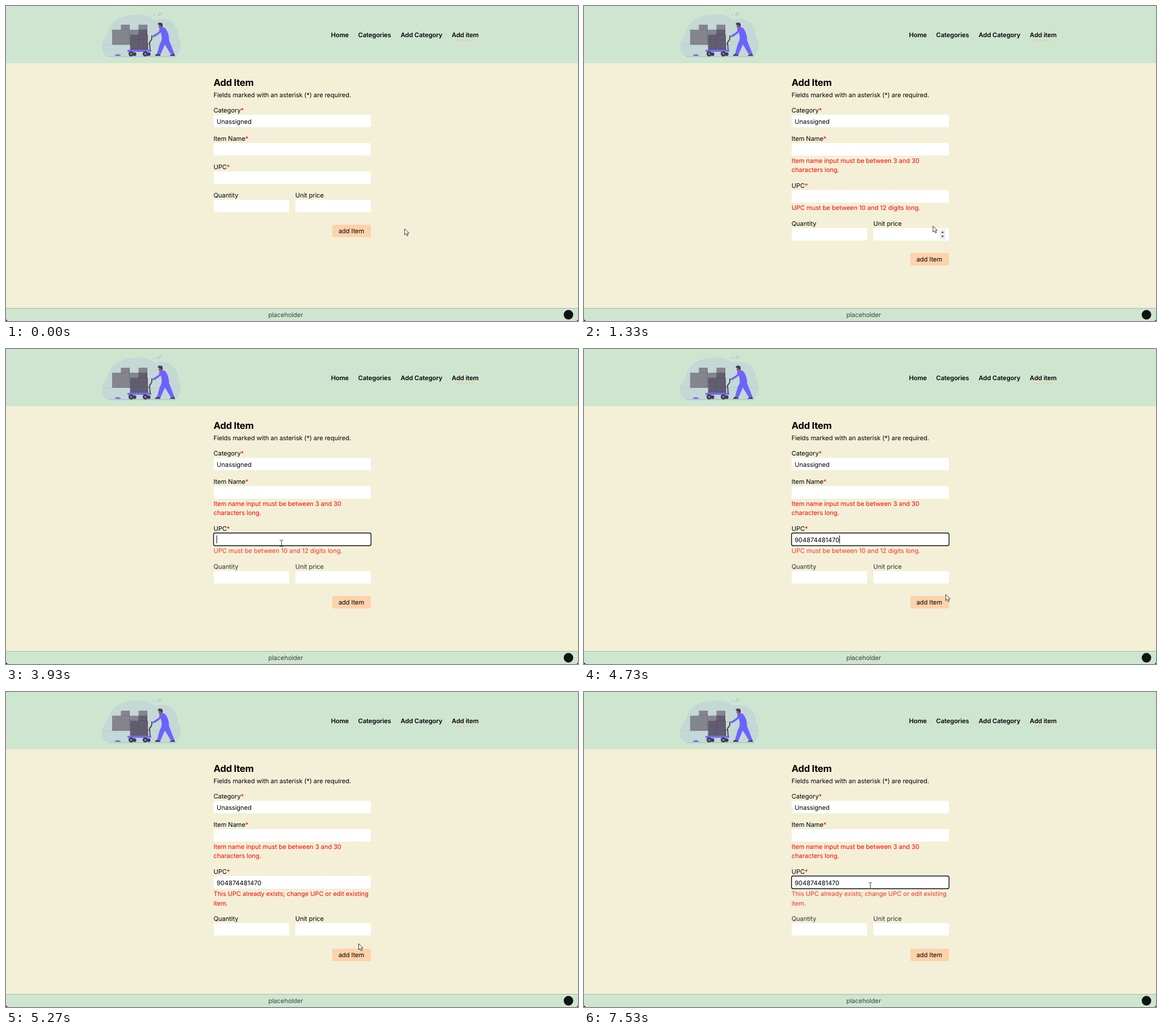
Animation of 1008x556 px, one loop 8000 ms. Source, as an HTML page with a canvas:

```html
<!DOCTYPE html>
<html lang="en">
<head>
<meta charset="utf-8">
<title>Add Item</title>
<style>
html, body { margin: 0; width: 100%; height: 100%; overflow: hidden; background: #f3f0d7; }
canvas { display: block; width: 1008px; height: 556px; }
</style>
</head>
<body>
<canvas id="stage" width="1008" height="556"></canvas>
<script>
const ctx = document.getElementById('stage').getContext('2d');
const LOOP = 8000;
const ZOOM = 0.6925;          // page zoom: 16px text with 24px lines
const LINE = 24 * ZOOM;
const LEFT = 365.7, WIDE = 400 * ZOOM, HALF = 192 * ZOOM, FIELD = 32 * ZOOM;
const UNIT_X = LEFT + WIDE - HALF;
const MINT = '#cee5d0', CREAM = '#f3f0d7', PEACH = '#fed2aa', ORANGE = '#ffbf86';
const VIOLET = '#6c63ff', DARK = '#3f3d56', SKIN = '#a0616a', RED = '#ff0000';

// Pointer path: time, x, y
const POINTER = [
  [0, 702, 393], [600, 702, 393], [670, 684, 394], [730, 637, 391], [800, 614.5, 388],
  [2530, 614.5, 388], [2600, 615.5, 388], [2670, 616, 388], [3000, 616, 388],
  [3070, 585, 377], [3130, 530, 361], [3200, 504, 354.5], [3530, 504, 354.5],
  [3730, 492, 347], [3930, 485, 343], [4200, 485, 343], [4330, 528, 362],
  [4470, 632, 408], [4600, 688, 436], [4670, 668, 435], [4730, 637, 433],
  [4800, 626, 439], [4930, 621, 444], [5730, 621, 444], [5930, 616, 430],
  [6130, 585, 402], [6330, 535, 366], [6470, 510, 348], [6600, 504, 342], [LOOP, 504, 342]
];

const within = (t, from, to) => t >= from && t < to;
const inside = (p, x, y, w, h) => p.x >= x && p.x <= x + w && p.y >= y && p.y <= y + h;

function pointerAt(t) {
  const i = Math.max(1, POINTER.findIndex(k => k[0] >= t));
  const [t0, x0, y0] = POINTER[i - 1], [t1, x1, y1] = POINTER[i];
  const f = (t - t0) / (t1 - t0);
  return { x: x0 + (x1 - x0) * f, y: y0 + (y1 - y0) * f };
}

function rect(x, y, w, h, color) {
  ctx.fillStyle = color;
  ctx.fillRect(x, y, w, h);
}

// Form boxes sit on whole pixels
function box(x, y, w, color) {
  const left = Math.round(x);
  ctx.fillStyle = color;
  ctx.beginPath();
  ctx.roundRect(left, Math.round(y), Math.round(x + w) - left, Math.round(FIELD), 2.8);
  ctx.fill();
}

function disc(x, y, r, color) {
  ctx.fillStyle = color;
  ctx.beginPath();
  ctx.arc(x, y, r, 0, 2 * Math.PI);
  ctx.fill();
}

function shape(d, color) {
  ctx.fillStyle = color;
  ctx.fill(new Path2D(d));
}

function line(d, color, width) {
  ctx.strokeStyle = color;
  ctx.lineWidth = width;
  ctx.stroke(new Path2D(d));
}

// Draws text centred vertically on cy; returns its width
function text(str, x, cy, { color = '#000', size = 16, weight = 400 } = {}) {
  ctx.save();
  ctx.translate(x, Math.round(cy + size * ZOOM * 0.364));
  ctx.scale(ZOOM, ZOOM);
  ctx.font = `${weight} ${size}px Inter, sans-serif`;
  ctx.letterSpacing = `${(14 - size) * 0.04}px`;   // larger optical sizes are set tighter
  ctx.fillStyle = color;
  ctx.fillText(str, 0, 0);
  const width = ctx.measureText(str).width * ZOOM;
  ctx.restore();
  return width;
}

function crate(x, y, color, seam) {
  rect(x, y, 15.5, 8.8, color);
  rect(x, y + 8.1, 15.5, 0.7, seam);
  rect(x + 14.8, y, 0.7, 8.8, seam);
}

function crates(x, y, cols, rows, color, seam) {
  for (let i = 0; i < cols * rows; i++) {
    crate(x + (i % cols) * 15.5, y + Math.floor(i / cols) * 8.8, color, seam);
  }
}

function illustration() {
  shape('M180 89C168 85 166 68 173 59C180 52 180 44 184 36C192 22 212 15 232 15C248 15 256 19 263 25' +
    'C272 21 284 22 291 28C300 35 304 45 303 54C311 65 310 81 298 89Q240 91 180 89Z', '#c4d8d5');
  shape('M266 18Q266 12 274 11.5Q275 17 266 18ZM259 18Q259 14 263 14Q264 17 259 18Z', '#bdd3cc');
  line('M173 68.5H306', '#b4c7cb', 0.6);

  const back = ['#84858f', '#6d6d7c'], front = ['#625d70', '#49445a'];
  crates(187, 41.8, 4, 3, ...back);
  crates(202.5, 33, 1, 1, ...back);
  crates(233.5, 33, 1, 1, ...back);
  crates(233.5, 42, 1, 1, ...front);
  crates(218.7, 50.8, 2, 3, ...front);

  line('M254 79L253 64Q258 60 257 52', DARK, 1.8);
  line('M250 79L249.5 66M250 67H254', DARK, 1);
  shape('M214 77.5H256V80.8H214Z', VIOLET);
  for (const x of [220.5, 245.5]) {
    disc(x, 84.5, 4.6, DARK);
    disc(x, 84.5, 1.6, '#a09fae');
    disc(x + 6, 85, 3.2, DARK);
  }
  shape('M192 88Q193 84 196 86Q197 83 199 86Q202 85 202 88Z', VIOLET);
  line('M180 89.5H300', '#9ba6b5', 0.6);

  shape('M275 59L284 57L288 62L297 85L291.5 87L280 68L272 86L266 85L271 67Z', VIOLET);
  shape('M270 40Q275 36 280 38.5Q288 47 287.5 63Q281 66 274 62Q276 50 270 43Z', VIOLET);
  ctx.save();
  ctx.lineCap = ctx.lineJoin = 'round';
  line('M274 43L268 48.5L261 53', VIOLET, 3.4);
  ctx.restore();
  disc(259.7, 53.3, 1.3, SKIN);
  shape('M269 33L275 33L276 38L272 39.5L269 38Z', SKIN);
  shape('M267.5 32Q268 28.5 273 29.5Q277 30 276 36L273.5 37Q273 33 268 33Z', DARK);
  shape('M262.5 87.5Q264 85 266 84.5L272 86V88H262.5ZM288 88Q289 86 292 86L296.5 84.5L298 88Z', DARK);
}

function chrome() {
  rect(0, 0, 1008, 556, CREAM);
  rect(0, 0, 1008, 101, MINT);
  illustration();
  const links = { 'Home': 572.8, 'Categories': 620.6, 'Add Category': 695.5, 'Add item': 785.6 };
  for (const name in links) text(name, links[name], 51, { weight: 600 });
  for (let i = 0; i < 6; i++) disc(796.6 + i * 5.2, 60.2, 1.3, ORANGE);
  rect(0, 533, 1008, 23, MINT);
  rect(0, 533, 1008, 1, '#a9bbac');
  text('placeholder', 462.2, 545.3, { color: '#3c4340' });
  disc(991.2, 545, 8.4, '#101411');
  shape('M0 552Q0.5 555.5 4 556H0ZM1008 553Q1007.5 555.5 1005 556H1008Z', '#111');
}

function label(str, y, required) {
  const width = text(str, LEFT, y);
  if (required) text('*', LEFT + width, y, { color: RED });
}

function errors(lines, y) {
  lines.forEach((str, i) => text(str, LEFT, y + FIELD + LINE * (i + 0.5), { color: RED }));
}

function focusRing(y) {
  ctx.strokeStyle = '#101024';
  ctx.lineWidth = 1.4;
  ctx.beginPath();
  ctx.roundRect(Math.round(LEFT) - 0.3, Math.round(y) - 0.3, Math.round(WIDE) + 0.6, Math.round(FIELD) + 0.6, 3);
  ctx.stroke();
}

function spinner(y) {
  rect(627, y + 2, 10, 18, '#efefef');
  shape(`M629.4 ${y + 8.6}h5l-2.5 -3zM629.4 ${y + 13.6}h5l-2.5 3z`, '#444');
}

function arrow({ x, y }) {
  ctx.save();
  ctx.translate(x, y);
  const d = 'M0.5 0.3V11L3 8.8L4.8 12.8L6.6 12L4.9 8.1H8.2Z';
  shape(d, '#fff');
  line(d, '#222', 0.9);
  ctx.restore();
}

function beam({ x, y }) {
  ctx.save();
  ctx.translate(Math.round(x) + 0.5, y);
  line('M-3 -5.5H-0.8L0 -4.8L0.8 -5.5H3M0 -4.8V4.8M-3 5.5H-0.8L0 4.8L0.8 5.5H3', '#333', 0.95);
  ctx.restore();
}

function draw(t) {
  const p = pointerAt(t);
  const nameErrors = t < 1330 ? [] : ['Item name input must be between 3 and 30', 'characters long.'];
  const upcErrors = t < 1330 ? [] : t < 5270 ? ['UPC must be between 10 and 12 digits long.']
    : ['This UPC already exists; change UPC or edit existing', 'item.'];
  const upcY = 292.2 + nameErrors.length * LINE;
  const unitY = upcY + 49.8 + upcErrors.length * LINE;
  const buttonX = 574.8, buttonY = unitY + 2 * FIELD, buttonW = LEFT + WIDE - buttonX;
  const focused = within(t, 3730, 5070) || t >= 7000;
  const pasted = t >= 4400;
  const caret = within(t, 3730, 4200) || within(t, 4400, 4900) || within(t, 7000, 7530);

  chrome();
  text('Add Item', LEFT, 135, { size: 24, weight: 700 });
  text('Fields marked with an asterisk (*) are required.', LEFT, 156.6);

  label('Category', 184.2, true);
  box(LEFT, 192.4, WIDE, '#fff');
  text('Unassigned', 371.3, 203.5);

  label('Item Name', 234, true);
  box(LEFT, 242.3, WIDE, '#fff');
  errors(nameErrors, 242.3);

  label('UPC', upcY - LINE / 2, true);
  box(LEFT, upcY, WIDE, '#fff');
  if (focused) focusRing(upcY);
  const typed = pasted ? text('904874481470', 371.3, upcY + FIELD / 2) : 0;
  if (caret) rect(Math.round(371.3 + typed), Math.round(upcY) + 4, 1, 14, '#111');

  ctx.globalAlpha = focused ? 0.8 : 1;
  errors(upcErrors, upcY);
  text('Quantity', LEFT, unitY - LINE / 2);
  text('Unit price', UNIT_X, unitY - LINE / 2);
  ctx.globalAlpha = 1;
  box(LEFT, unitY, HALF, '#fff');
  box(UNIT_X, unitY, HALF, '#fff');
  if (inside(p, UNIT_X, unitY - LINE, HALF, LINE + FIELD)) spinner(Math.round(unitY));

  const hover = inside(p, buttonX, buttonY, buttonW, FIELD);
  box(buttonX, buttonY, buttonW, hover ? ORANGE : PEACH);
  text('add Item', buttonX + 16 * ZOOM, buttonY + FIELD / 2);

  const onText = inside(p, LEFT, upcY, WIDE, FIELD)
    || (upcErrors.length > 0 && inside(p, LEFT, upcY + FIELD, 226, LINE))
    || (inside(p, UNIT_X, unitY, HALF, FIELD) && p.x < 626);
  (onText ? beam : arrow)(p);
}

ctx.textRendering = 'geometricPrecision';
const start = performance.now();

// Motion advances at 15 steps per second, on a 10 ms clock
function frame() {
  const step = Math.floor(((performance.now() - start) % LOOP) * 0.015 + 0.06);
  draw(Math.min(LOOP - 1, Math.round(step * 20 / 3) * 10));
  requestAnimationFrame(frame);
}
frame();
</script>
</body>
</html>
```
